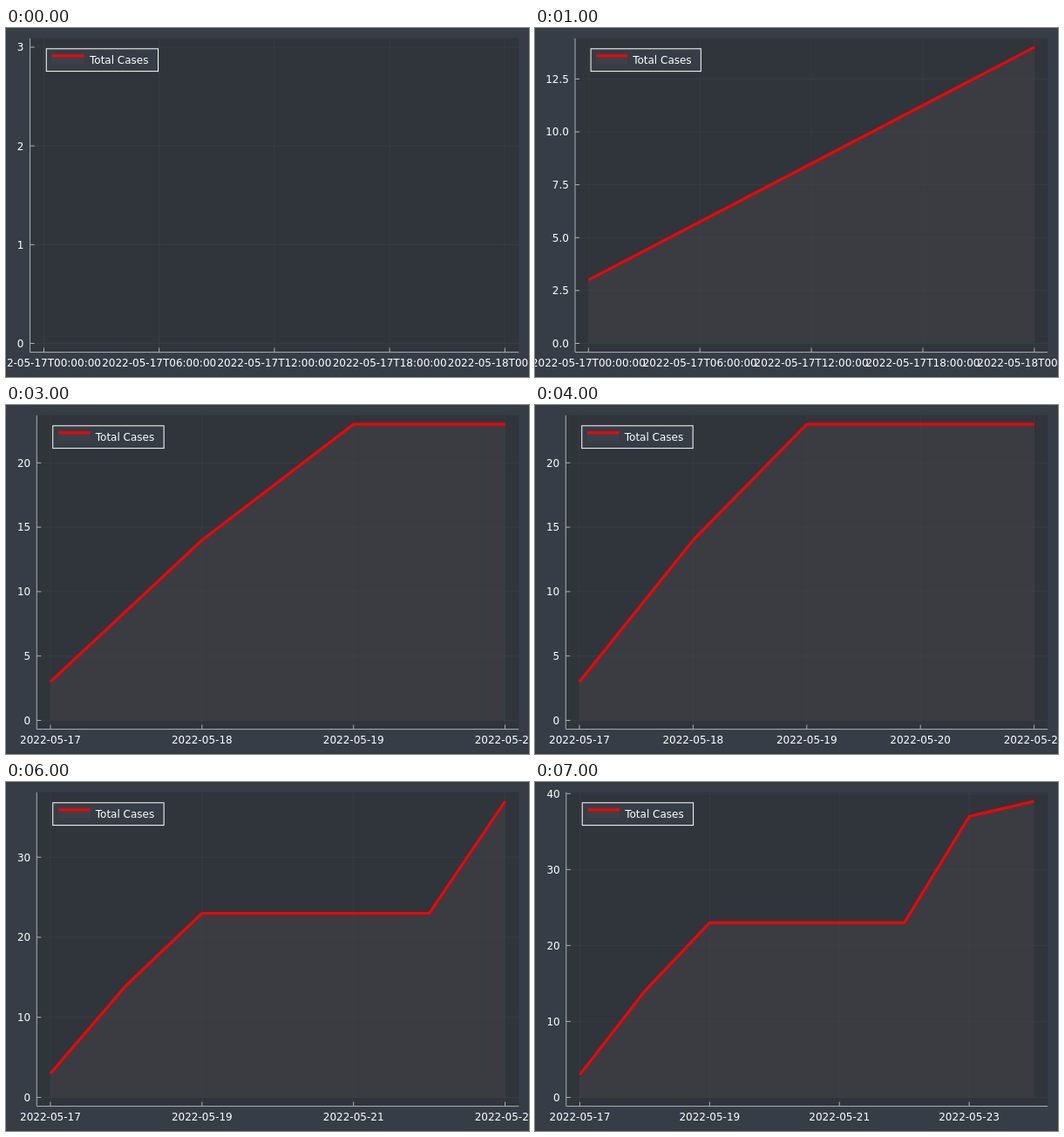
An HTML page for the animation above (8000 ms loop, 600x400 px).

```html
<!DOCTYPE html>
<html lang="en">
<head>
<meta charset="utf-8">
<title>Total Cases</title>
<style>
html, body { margin: 0; width: 100%; height: 100%; overflow: hidden; background: #363d46; }
svg { display: block; width: 600px; height: 400px; }
text { font: 12px "DejaVu Sans", sans-serif; fill: #fff; }
.grid { stroke: #adb2b7; stroke-opacity: .06; }
.axis { stroke: #adb2b7; fill: none; }
.area { fill: rgb(68, 68, 75); fill-opacity: .5; }
.line { stroke: #f00; stroke-width: 3; stroke-linejoin: round; fill: none; }
.legend { fill: #363d46; stroke: #fff; }
</style>
</head>
<body>
<svg id="chart" viewBox="0 0 600 400"></svg>
<script>
const STEP = 1000;
const TOP = 11.8, RIGHT = 588.2, BOTTOM = 371.6;
const BASE = 361.5, PEAK = 22;
const cases = [3, 14, 23, 23, 23, 23, 37, 39];
const chart = document.getElementById("chart");

const tag = (name, attrs, body = "") =>
  `<${name} ${Object.entries(attrs).map(([k, v]) => `${k}="${v}"`).join(" ")}>${body}</${name}>`;
const path = (cls, d) => tag("path", { class: cls, d });
const label = (x, y, anchor, body) => tag("text", { x, y, "text-anchor": anchor }, body);
const box = (cls, x, y, width, height) => tag("rect", { class: cls, x, y, width, height });

const range = (max, step) => {
  const out = [];
  for (let v = 0; v <= max; v += step) out.push(v);
  return out;
};

// Axis layout for the first n days of data
function layout(n) {
  if (n === 1) return { left: 27.6, xStep: .25, yStep: 1, yTop: 3 };
  if (n === 2) return { left: 46, xStep: .25, yStep: 2.5, yTop: 12.5 };
  if (n < 7) return { left: 35.3, xStep: 1, yStep: 5, yTop: 20 };
  if (n === 7) return { left: 35.3, xStep: 2, yStep: 10, yTop: 30 };
  return { left: 35.8, xStep: 2, yStep: 10, yTop: 40 };
}

function dateLabel(day, withTime) {
  const iso = new Date(Date.UTC(2022, 4, 17) + day * 864e5).toISOString();
  return iso.slice(0, withTime ? 19 : 10);
}

function legend(left, width) {
  const x = left + width / 30;
  const sx = x + width / 90, ex = x + width * .0775;
  return box("legend", x, 23.8, 66.6 + width * .11, 25.8) +
    box("area", sx, 32, ex - sx, 9.5) +
    path("line", `M${sx} 31.7H${ex}`) +
    label(x + width * .0887, 41.2, "start", "Total Cases");
}

function draw(n) {
  const { left, xStep, yStep, yTop } = layout(n);
  const width = RIGHT - left, pad = width * .03 / 1.06;
  const days = Math.max(1, n - 1);
  const data = cases.slice(0, n);
  const max = Math.max(...data);
  const px = d => left + pad + d / days * (width - 2 * pad);
  const py = v => BASE - v / max * (BASE - PEAK);

  let grid = "", axis = `M${left} ${TOP}V${BOTTOM}H${RIGHT}`, labels = "";
  for (const d of range(days, xStep)) {
    const x = px(d);
    grid += `M${x} ${TOP}V${BOTTOM}`;
    axis += `M${x} ${BOTTOM}v-5`;
    labels += label(x, 387.6, "middle", dateLabel(d, xStep < 1));
  }
  for (const v of range(yTop, yStep)) {
    const y = py(v);
    grid += `M${left} ${y}H${RIGHT}`;
    axis += `M${left} ${y}h5`;
    labels += label(left - 7.1, y + 4.4, "end", yStep % 1 ? v.toFixed(1) : v);
  }

  let curve = "";
  if (n > 1) {
    const pts = data.map((v, i) => `${px(i)} ${py(v)}`).join("L");
    curve = path("area", `M${px(0)} ${BASE}L${pts}V${BASE}Z`) + path("line", "M" + pts);
  }

  chart.innerHTML = tag("rect", { x: left, y: TOP, width, height: BOTTOM - TOP, fill: "#30343b" }) +
    path("grid", grid) + path("axis", axis) + labels + curve + legend(left, width);
}

let shown = 0;
function tick(now) {
  const n = Math.floor(now / STEP) % cases.length + 1;
  if (n !== shown) draw(shown = n);
  requestAnimationFrame(tick);
}
draw(shown = 1);
requestAnimationFrame(tick);
</script>
</body>
</html>
```
